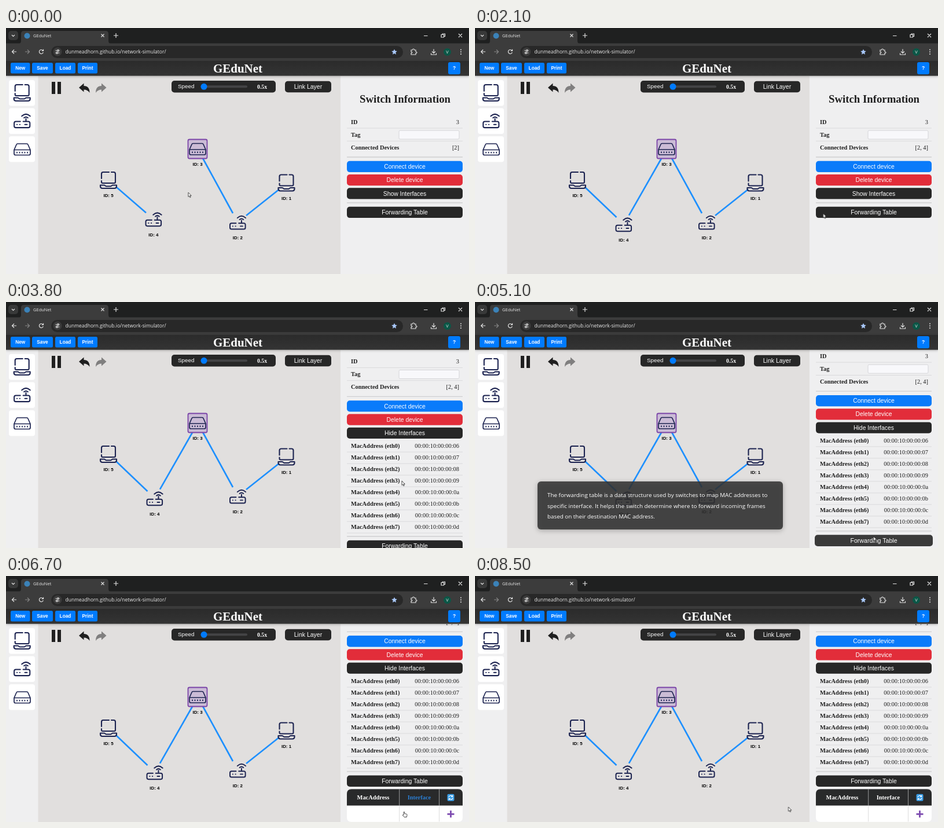
An HTML page that plays this animation: 800x425 px, repeating every 8600 ms.

```html
<!DOCTYPE html>
<html lang="en">
<head>
<meta charset="utf-8">
<title>GEduNet</title>
<style>
html, body { margin: 0; width: 100%; height: 100%; overflow: hidden; background: #e1dfde; }
svg { display: block; width: 800px; height: 425px; }
text { font-family: "Liberation Sans", Arial, sans-serif; font-size: 10.4px; }
.ui { font-family: "Open Sans", "Noto Sans", sans-serif; fill: #e8e8e8; }
.serif { font-family: "Liberation Serif", "Times New Roman", serif; fill: #1f1f1f; }
.bold { font-weight: bold; }
.mid { text-anchor: middle; }
.end { text-anchor: end; }
.white { fill: #fff; }
.line { fill: none; stroke: #e3e3e3; stroke-width: 1.2; }
.icon { fill: none; stroke: #1c2350; stroke-width: 2.1; stroke-linecap: round; stroke-linejoin: round; }
.link { stroke: #1e90ff; stroke-width: 2.7; }
.header { filter: drop-shadow(0 1px 2px rgba(0, 0, 0, .25)); }
.card { filter: drop-shadow(0 2px 4px rgba(0, 0, 0, .3)); }

#cursor, #scroll, #tip, #node4, #lower, .anim { animation: 8.6s linear infinite; }
#node4, #lower, .anim { animation-timing-function: step-end; }

#cursor { animation-name: cursor; }
@keyframes cursor {
  0% { transform: translate(315px, 284px); }
  7%, 11.6% { transform: translate(258px, 337px); }
  18% { transform: translate(430px, 334px); }
  24.42% { transform: translate(601.5px, 320.5px); }
  28% { transform: translate(640px, 318px); }
  32% { transform: translate(668px, 292px); }
  36%, 39% { transform: translate(684px, 287px); }
  44.19% { transform: translate(684px, 309px); }
  49% { transform: translate(684px, 320px); }
  54%, 63% { transform: translate(688.5px, 405px); }
  68.6%, 72% { transform: translate(691.5px, 366px); }
  75% { transform: translate(690px, 385px); }
  77.91%, 84% { transform: translate(687px, 407px); }
  95% { transform: translate(562px, 401px); }
  98.84%, 100% { transform: translate(541.5px, 399px); }
}
#scroll { animation-name: scroll; }
@keyframes scroll {
  0%, 39% { transform: translateY(0); }
  44.19% { transform: translateY(-59.5px); }
  46%, 64% { transform: translateY(-68.8px); }
  68.6% { transform: translateY(-99.5px); }
  72.5%, 100% { transform: translateY(-126.7px); }
}
#tip { animation-name: tip; }
@keyframes tip {
  0%, 25% { opacity: 0; transform: translateY(9px); }
  27.5%, 30% { opacity: 1; transform: none; }
  32.5%, 53.5% { opacity: 0; transform: translateY(9px); }
  56%, 63.5% { opacity: 1; transform: none; }
  66%, 100% { opacity: 0; transform: translateY(9px); }
}
#node4 { animation-name: node4; }
@keyframes node4 { 0% { transform: translate(-2px, -9px); } 8.1%, 100% { transform: none; } }
#lower { animation-name: lower; }
@keyframes lower { 0% { transform: none; } 36.5%, 100% { transform: translateY(162.5px); } }
.before { animation-name: before !important; }
@keyframes before { 0% { visibility: visible; } 8.1%, 100% { visibility: hidden; } }
.after { animation-name: after !important; }
@keyframes after { 0% { visibility: hidden; } 8.1%, 100% { visibility: visible; } }
.closed { animation-name: closed !important; }
@keyframes closed { 0% { visibility: visible; } 36.5%, 100% { visibility: hidden; } }
.open { animation-name: open !important; }
@keyframes open { 0% { visibility: hidden; } 36.5%, 100% { visibility: visible; } }
.table { animation-name: table !important; }
@keyframes table { 0% { visibility: hidden; } 62.8%, 100% { visibility: visible; } }
.hand { animation-name: hand !important; }
@keyframes hand { 0% { visibility: hidden; } 74.5% { visibility: visible; } 84%, 100% { visibility: hidden; } }
.arrow { animation-name: arrow !important; }
@keyframes arrow { 0% { visibility: visible; } 74.5% { visibility: hidden; } 84%, 100% { visibility: visible; } }
.column { animation-name: column !important; }
@keyframes column { 0% { fill: #fff; } 75.5% { fill: #2b7fd4; } 80.2%, 100% { fill: #fff; } }

.button { transform-box: fill-box; transform-origin: center; fill: #272727; }
.button text { fill: #fff; }
.hover-table { animation: hoverTable 8.6s linear infinite; }
@keyframes hoverTable {
  0%, 24.6% { transform: none; fill: #272727; }
  26%, 30% { transform: scale(1.02); fill: #3a3a3a; }
  31.5%, 53% { transform: none; fill: #272727; }
  54.5%, 63.5% { transform: scale(1.02); fill: #3a3a3a; }
  65%, 100% { transform: none; fill: #272727; }
}
.hover-show { animation: hoverShow 8.6s linear infinite; }
@keyframes hoverShow {
  0%, 32% { transform: none; fill: #272727; }
  33.5%, 39% { transform: scale(1.02); fill: #3a3a3a; }
  40.5%, 100% { transform: none; fill: #272727; }
}
</style>
</head>
<body>
<svg id="stage" viewBox="0 0 800 425"></svg>
<script>
const box = (x, y, w, h, fill, r = 0, extra = "") =>
  `<rect x="${x}" y="${y}" width="${w}" height="${h}" rx="${r}" fill="${fill}" ${extra}/>`;
const label = (x, y, str, cls = "", size = 10.4) =>
  `<text x="${x}" y="${y}" class="${cls}" style="font-size:${size}px">${str}</text>`;
const path = (d, cls = "line", extra = "") => `<path d="${d}" class="${cls}" ${extra}/>`;
const rule = (y, color = "#dadadc", width = 1) =>
  `<path d="M589 ${y}H789" stroke="${color}" stroke-width="${width}"/>`;

const icons = {
  laptop: path("M-12-3V-11Q-12-14-9-14H1M5-14H9Q12-14 12-11V3Q12 5 10 5H-10Q-12 5-12 3V1" +
    "M-14 8.5H-7L-4 10.5H4L7 8.5H14V10.5Q14 14 10.5 14H-10.5Q-14 14-14 10.5Z", "icon"),
  router: path("M-3 1H-11Q-14 1-14 4V9Q-14 12-11 12H11Q14 12 14 9V4Q14 1 11 1H2M7-4V1" +
    "M3.5-5.5Q7-8.5 10.5-5.5M-.5-8.5Q7-15.5 14.5-8.5M-9 6.5h.2M-4 6.5h.2M5 6.5H9", "icon"),
  switch: path("M-14 1L-10-8Q-9.5-9.5-8-9.5H8Q9.5-9.5 10 -8L14 1V7.5Q14 10 11.5 10H-11.5Q-14 10-14 7.5Z" +
    "M-14 1H14", "icon", 'style="stroke-width:1.7"') +
    path("M-9 5.2v1M-4.5 5.2v1M0 5.2v1M4.5 5.2v1M9 5.2v1", "icon", 'style="stroke-width:1.8"')
};
const icon = (kind, x, y, scale = 1) =>
  `<g transform="translate(${x} ${y}) scale(${scale})">${icons[kind]}</g>`;
const device = (kind, x, y, id, labelY, scale) =>
  icon(kind, x, y, scale) + label(x, labelY, `ID: ${id}`, "mid bold", 7.9);
const link = (x1, y1, x2, y2, cls = "") =>
  `<g class="${cls}"><path class="link" d="M${x1} ${y1}L${x2} ${y2}"/></g>`;
const button = (y, str, fill = "inherit", hover = "") =>
  `<g class="button ${hover}">${box(589, y, 200, 19.3, fill, 5)}${label(689, y + 13.3, str, "mid")}</g>`;

function browser() {
  return box(0, 0, 800, 27, "#1f2020") + box(4, 5, 17, 16, "#383939", 5) +
    path("M10 12l2.5 2.5L15 12") +
    path("M22 27Q26 27 26 22V10Q26 5 31 5H172Q177 5 177 10V22Q177 27 181 27Z", "", 'fill="#3c3c3c"') +
    '<circle cx="36.5" cy="13.5" r="5" fill="#3b82b8"/>' +
    label(47, 16.3, "GEduNet", "ui", 7.5) +
    path("M164.5 10.5l5 5m0-5l-5 5M186 13h8m-4-4v8M722 13.5h6.5M782 10l6 6m0-6l-6 6") +
    path("M752 11.5h4.5v4.5h-4.5zM754 11.5V10h4.5v4.5H757") +
    box(0, 26.5, 800, 31, "#3c3c3c") + box(78, 31, 608, 21, "#282828", 10.5) +
    path("M18 41H10.5M14 37.5L10.5 41l3.5 3.5") +
    path("M33 41h7.5M37 37.5l3.5 3.5-3.5 3.5", "line", 'style="stroke:#858585"') +
    path("M63.8 39A3.5 3.5 0 1 0 64.3 42M64.5 36.8v2.7h-2.7") +
    '<circle cx="89" cy="41" r="7.5" fill="#3c3c3c"/>' +
    path("M85.5 39h3m3 0h1M85.5 43h1m3 0h3") +
    '<g class="line"><circle cx="90" cy="39" r="1.3"/><circle cx="88" cy="43" r="1.3"/></g>' +
    label(102.5, 44.3, "dunmeadhorn.github.io/network-simulator/", "ui", 8.5) +
    path("M671 36.5l1.4 3.1 3.4.4-2.5 2.3.7 3.4-3-1.7-3 1.7.7-3.4-2.5-2.3 3.4-.4z", "", 'fill="#a8c7fa"') +
    path("M700 38h2.5q0-2 1.5-2t1.5 2H708v3q2 0 2 1.3T708 43.5V46H700V43.5q1.7 0 1.7-1.3T700 41Z") +
    path("M739 36.5v6.5M736 40.5l3 3 3-3M734.5 43.5V46h9v-2.5") +
    '<circle cx="762.5" cy="41.5" r="6.5" fill="#0b5747"/>' + label(762.5, 44.2, "V", "ui mid", 7.5) +
    [37.5, 41.2, 45].map(y => `<circle cx="786" cy="${y}" r="1" fill="#e3e3e3"/>`).join("");
}

function header() {
  const items = [["New", 8, 33.5], ["Save", 45, 36], ["Load", 85, 35], ["Print", 124, 34]];
  return `<g class="header">${box(0, 57, 800, 25.6, "url(#bar)")}</g>` +
    items.map(([str, x, w]) => box(x, 60, w, 18.5, "#007bff", 2.5) +
      label(x + w / 2, 72.3, str, "mid bold white", 8.3)).join("") +
    label(400.5, 77, "GEduNet", "serif bold mid white", 21) +
    box(764, 59, 21, 21, "#007bff", 3) + label(774.5, 72.4, "?", "mid bold white", 8.5);
}

function canvas() {
  return box(55, 83, 523, 342, "#e1dfde") + box(0, 83, 55.5, 342, "#efeff0") +
    [90, 138.5, 187].map(y => box(5, y, 45, 44.5, "#fff", 4)).join("") +
    icon("laptop", 27.7, 112) + icon("router", 27.7, 160.5, .97) + icon("switch", 28, 209.5) +
    box(79, 93, 6, 21, "#1f1f1f") + box(89, 93, 6, 21, "#1f1f1f") +
    `<g id="undo">${path("M126 103L134.5 95.5V100Q144.5 100 144.5 112Q141 106.5 134.5 106.5V110.5Z", "", 'fill="#1f1f1f"')}</g>` +
    '<use href="#undo" transform="translate(299.5 0) scale(-1 1)" opacity=".5"/>' +
    box(286, 91, 180, 20.5, "#272727", 5) + label(297, 104.4, "Speed", "white", 9.8) +
    box(337, 99.2, 80, 4, "#444446", 2) + '<circle cx="342" cy="101.3" r="5.5" fill="#007bff"/>' +
    label(434, 104.6, "0.5x", "serif bold white", 9.8) +
    box(482, 91.7, 80, 19.5, "#272727", 5) + label(522, 105.2, "Link Layer", "mid white", 10.5) +
    link(190, 274.3, 242, 319.3, "anim before") + link(190, 275, 244.5, 327, "anim after") +
    link(266, 323.7, 322, 225.5, "anim after") + link(340, 225, 392, 320) + link(415, 324, 472, 278.8) +
    box(314.5, 192.5, 33, 33, "#cbbcd6", 2.5, 'stroke="#7b45a8" stroke-width="1.8"') +
    device("switch", 331, 209, 3, 238) + device("laptop", 177, 263, 5, 292) +
    device("laptop", 484.5, 267.5, 1, 297) + device("router", 400.3, 336.2, 2, 364.7, .95) +
    `<g id="node4">${device("router", 256.8, 339.8, 4, 368.7, .95)}</g>`;
}

function table() {
  return '<g class="anim table">' +
    path("M589 523.5V503Q589 495 597 495H781Q789 495 789 503V523.5Z", "", 'fill="#292a2b"') +
    path("M589 523.5H789V544Q789 551.5 781 551.5H597Q589 551.5 589 544Z", "", 'fill="#fff"') +
    path("M679.7 495V523.5M748.5 495V523.5", "", 'stroke="#b5b5b5" stroke-width=".8"') +
    path("M679.7 523.5V551M748.5 523.5V551", "", 'stroke="#dcdcdc"') +
    label(634.5, 512.6, "MacAddress", "serif bold mid white") +
    label(714, 512.6, "Interface", "serif bold mid white anim column") +
    box(762.5, 503.5, 12, 12, "#3a9ee8", 2) +
    path("M765 509A3.5 3.5 0 0 1 771 507.2M771.6 505.4V507.8H769.2" +
      "M772 510A3.5 3.5 0 0 1 766 511.8M765.4 513.6V511.2H767.8", "line", 'style="stroke:#fff"') +
    path("M762.5 538h12m-6-6v12", "", 'stroke="#7d4bb0" stroke-width="2.8"') + "</g>";
}

function panel() {
  const row = (y, name, value) => label(596, y, name, "serif bold") + label(783, y, value, "serif end");
  const interfaces = Array.from({ length: 8 }, (_, i) =>
    row(312 + 20 * i, `MacAddress (eth${i})`, `00:00:10:00:00:0${(6 + i).toString(16)}`) +
    rule(318.7 + 20 * i)).join("");
  return box(578, 83, 222, 342, "#efeff0") + '<g clip-path="url(#view)"><g id="scroll">' +
    label(689.5, 129, "Switch Information", "serif bold mid", 18.8) +
    row(166, "ID", "3") + rule(173) + row(188, "Tag", "") + rule(195.3) +
    box(679, 177, 104, 15, "#f8f8fb", 2, 'stroke="#d5d5d8"') +
    label(596, 210, "Connected Devices", "serif bold") +
    label(783, 210, "[2]", "serif end anim before") + label(783, 210, "[2, 4]", "serif end anim after") +
    rule(223, "#cfcfd1", 1.3) +
    button(229.8, "Connect device", "#0a7bfa") + button(253, "Delete device", "#e22d3a") +
    `<g class="anim closed">${button(276.2, "Show Interfaces", "inherit", "hover-show")}</g>` +
    `<g class="anim open">${button(276.2, "Hide Interfaces", "inherit", "hover-show")}${interfaces}</g>` +
    `<g id="lower">${rule(302, "#cfcfd1", 1.3)}${button(308.8, "Forwarding Table", "inherit", "hover-table")}</g>` +
    table() + "</g></g>";
}

function tooltip() {
  const lines = [
    "The forwarding table is a data structure used by switches to map MAC addresses to",
    "specific interface. It helps the switch determine where to forward incoming frames",
    "based on their destination MAC address."
  ];
  return `<g id="tip">${box(108, 310, 424, 83, "rgba(50,50,50,.86)", 6, 'class="card"')}` +
    lines.map((str, i) => label(125, 337 + 18.7 * i, str, "ui white", 9.86)).join("") + "</g>";
}

function pointer() {
  const style = 'fill="#fff" stroke="#222" stroke-width=".8" stroke-linejoin="round"';
  return '<g id="cursor"><g class="anim arrow">' +
    path("M0 0V7.5L1.7 6 2.9 8.7 4.2 8.1 3 5.5H5.3Z", "", style) + '</g><g class="anim hand">' +
    path("M0 5V.9Q.9-.3 1.7.9V3.6L5 4.2Q6 4.5 6 5.5L5.3 9.5H1L-1.8 6.2Q-1.5 4.9 0 6Z", "", style) +
    "</g></g>";
}

document.getElementById("stage").innerHTML =
  `<defs><linearGradient id="bar" x2="0" y2="1"><stop stop-color="#2b2b2b"/><stop offset="1" stop-color="#343434"/></linearGradient>
  <clipPath id="view"><rect x="578" y="83" width="222" height="342"/></clipPath></defs>` +
  canvas() + panel() + browser() + header() + tooltip() + pointer();
</script>
</body>
</html>
```
